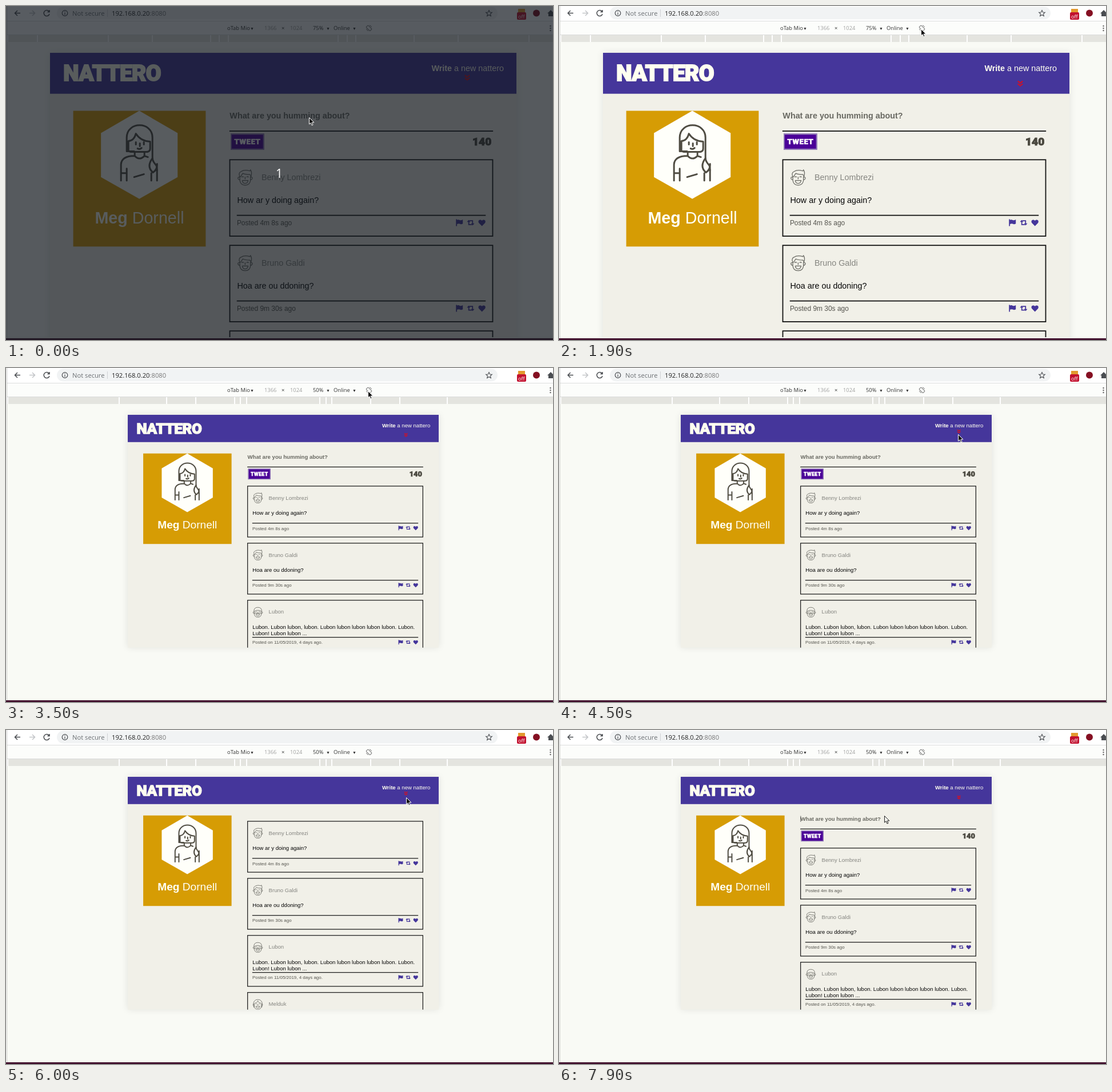
An HTML page for the animation above (8000 ms loop, 957 by 585 pixels).

```html
<!DOCTYPE html>
<html lang="en">
<head>
<meta charset="utf-8">
<title>Responsive demo</title>
<style>
* { box-sizing: border-box; margin: 0; padding: 0 }
html, body { width: 100%; height: 100%; overflow: hidden; background: #fff }
#stage { position: relative; width: 957px; height: 585px; overflow: hidden; background: #fff; font-family: "Liberation Sans", Arial, sans-serif }
#stage svg { display: block; overflow: visible }
.bar { position: absolute; inset: 0 0 auto; font-family: "Open Sans", sans-serif; white-space: nowrap }
.bar span { position: absolute; transform: translateY(-50%); line-height: 1 }
.chrome { position: absolute; left: 0; top: 0 }
.tools span { top: 39px; font-size: 9.4px; color: #333 }
.tools .dim { color: #a0a0a0 }
#ruler { position: absolute; left: 4px; right: 0; top: 51px; height: 12px; background: #e4e4df; overflow: hidden }
#ruler i { position: absolute; top: 0; width: 2px; height: 12px; background: #fff }
#view { position: absolute; left: 0; right: 0; top: 63px; height: 517px; overflow: hidden; background: #f9faf5 }
#page { position: absolute; top: 18.5px; left: 0; transform-origin: 0 0; overflow: hidden; background: #f1f0e8; font-size: 24px; line-height: 27.6px }
#shade { position: absolute; top: 18.5px; box-shadow: 0 0 12px rgba(0, 0, 0, .1) }
.block { font-family: Roboto, sans-serif; font-weight: 900; -webkit-text-stroke: .05em currentColor }
header { position: absolute; left: 0; right: 0; top: 0; height: 120px; background: #45369b; color: #fffff0 }
header .block { position: absolute; left: 39px; top: 20px; font-size: 65px; line-height: 80px; letter-spacing: -1px }
header p { position: absolute; right: 37px; top: 32px }
#hint { position: absolute; right: 135px; top: -9px; width: 18px; height: 18px }
.profile { position: absolute; left: 5%; top: 170px; width: 28.35%; height: 398px; background: #d69c04; color: #fffff5; text-align: center; font-size: 48px; line-height: 56px; white-space: nowrap }
.profile svg { width: 225px; height: 258px; margin: 0 auto 28px }
.feed { position: absolute; right: 5%; top: 170px; width: 56.55% }
#form { position: relative; height: 118px; overflow: hidden }
#form > * { position: absolute }
#form b { left: 1px; top: 1px; color: #696962 }
#form hr { left: 0; right: 0; top: 58px; height: 3px; border: 0; background: #111 }
#form .send { left: 4px; top: 67px; width: 98px; height: 47px; border: 3px solid #9583b8; background: #4b0098; color: #fff; font-size: 22px; line-height: 42px; text-align: center; letter-spacing: 1px }
#form .count { right: 5px; top: 74px; font-size: 32px; line-height: 34px; color: #4a483f }
#caret { left: 1px; top: 2px; width: 2px; height: 26px; background: #222 }
.card { position: relative; margin-top: 24px; min-height: 227px; border: 3px solid #111; padding: 0 19px }
.card > svg { position: absolute; left: 21px; top: 26px; width: 45px; height: 49px }
.card h4 { height: 103px; padding: 36px 0 0 72px; font-weight: 400; color: #858580 }
.card p { min-height: 57px; padding-left: 1px; color: #050505 }
.card footer { display: flex; height: 61px; border-top: 3px solid #111; font-size: 20px; line-height: 42px; color: #55544e }
.card footer svg { width: 22px; height: 20px; margin: 10px 0 0 11px }
.card footer svg:first-of-type { margin-left: auto }
#edge { position: absolute; left: 0; right: 0; top: 580px; height: 5px; background: linear-gradient(#eeeeea 0 2px, #43132f 2px) }
#side { position: absolute; left: 0; top: 0; width: 2px; height: 582px; background: linear-gradient(90deg, #fff 50%, #c9c9c6 50%) }
#dim { position: absolute; inset: 0; background: rgba(18, 24, 30, .7) }
#dim span { position: absolute; left: 472px; top: 280px; font: 21px/27px "Open Sans", sans-serif; color: #fff }
#mouse { position: absolute; left: 0; top: 0; width: 10px; height: 15px }
</style>
</head>
<body>
<div id="stage">
  <svg class="chrome" width="957" height="51" fill="none" stroke="#4a4d51" stroke-width="1.5">
    <rect x="89" y="1.5" width="771" height="22" rx="11" fill="#f1f3f4" stroke="none"/>
    <path d="M25 12.5H15.500M20 8L15.500 12.500L20 17"/>
    <path stroke="#c3c5c8" d="M41 12.500H50.500M46 8L50.500 12.500L46 17"/>
    <path d="M75.500 10A5 5 0 1 0 76 14M76 7V10.500H72.500"/>
    <g stroke-width="1.200"><circle cx="103" cy="12.500" r="4.800"/><path d="M103 12V15.500M103 9.500V10.800"/></g>
    <path stroke="#cfd1d4" stroke-width="1" d="M177.500 6V19"/>
    <path stroke-width="1.100" d="M845 7.500L846.600 11L850.300 11.300L847.500 13.800L848.300 17.500L845 15.500L841.700 17.500L842.500 13.800L839.700 11.300L843.400 11Z"/>
    <rect x="896" y="5" width="12" height="8" fill="#e39a2f" stroke="none"/>
    <rect x="894" y="11" width="16" height="13" rx="2" fill="#c2112f" stroke="none"/>
    <circle cx="928" cy="12.500" r="6" fill="#850f22" stroke="none"/>
    <path fill="#4a4d51" stroke="none" d="M947 13L953 7L959 13H957V18H949V13Z"/>
    <path stroke="#dcdddd" stroke-width="1" d="M0 26.500H957M0 50.500H957"/>
    <rect y="27" width="957" height="23" fill="#fcfdfb" stroke="none"/>
    <g stroke="#777" stroke-width="1"><rect x="632.500" y="34" width="5" height="9.500" rx="1" transform="rotate(-45 635 38.700)"/><path d="M630.500 40A5 5 0 0 0 634 43.500M639.500 37A5 5 0 0 0 636 33.800"/></g>
    <g fill="#666" stroke="none"><circle cx="952.500" cy="35" r="1.200"/><circle cx="952.500" cy="39" r="1.200"/><circle cx="952.500" cy="43" r="1.200"/></g>
  </svg>
  <div class="bar" style="font-size:11.2px">
    <span style="left:116px;top:12.500px;color:#6b6f73">Not secure</span>
    <span style="left:185px;top:12.500px;color:#222">192.168.0.20<span style="position:static;color:#777">:8080</span></span>
    <span style="left:896px;top:18px;color:#fff;font-size:9px">off</span>
  </div>
  <div class="bar tools">
    <span style="left:387px">oTab Mio</span><span style="left:427px;font-size:7px">▼</span>
    <span class="dim" id="wide" style="left:452px"></span><span style="left:482px">×</span><span class="dim" id="tall" style="left:497px"></span>
    <span id="zoom" style="left:537px"></span><span style="left:560px;font-size:7px">▼</span>
    <span style="left:573px">Online</span><span style="left:606px;font-size:7px">▼</span>
  </div>
  <div id="ruler"></div>
  <div id="view">
    <div id="shade"></div>
    <div id="page">
      <header>
        <div class="block">NATTERO</div>
        <p><b>Write</b> a new nattero</p>
        <svg id="hint" viewBox="0 0 18 18" fill="none" stroke="#dc0d1c" stroke-width="3.400"><path d="M2 2L9 8L16 2M2 10L9 16L16 10"/></svg>
      </header>
      <section class="profile">
        <svg viewBox="0 0 134 154" fill="none" stroke="#504d43" stroke-width="3" stroke-linecap="round" stroke-linejoin="round">
          <path fill="#fffffa" stroke="none" d="M67 0L134 39V116L67 154L0 116V39Z"/>
          <path d="M45 71V47C45 18 90 18 90 47V82C90 94 99 91 98 104M45 71H58M48 69V53Q58 52 61 40Q69 53 86 54V66Q86 72 79 72H55Q48 72 48 69"/>
          <path d="M61 55V59M75 55V59M68 57V62M64 66Q68 68 71 65"/>
          <path d="M59 73V79Q67 88 76 79V73M59 79Q36 79 35 94V122M35 109H45M45 101V122M76 79L82 81M90 83Q79 98 91 108Q99 102 98 93M88 109V122M98 104V122M58 116L75 111"/>
        </svg>
        <b>Meg</b> Dornell
      </section>
      <section class="feed">
        <div id="form">
          <b>What are you humming about?</b><i id="caret"></i><hr>
          <div class="block send">TWEET</div><div class="block count">140</div>
        </div>
        <div id="cards"></div>
      </section>
    </div>
  </div>
  <div id="edge"></div><div id="side"></div>
  <div id="dim"><span>1</span></div>
  <svg id="mouse" viewBox="0 0 10 15"><path d="M.5 .5V12L3.200 9.700L5 14L7 13.200L5.200 9H9Z" stroke-width="1"/></svg>
</div>
<script>
const $ = id => document.getElementById(id);
const LOOP = 8000, MID = 485, UNIT = .7965;

const hair = {
  tuft: 'M4 13Q1 6 6 4Q12 0 21 3L22 1Q25 5 23 12L21 9Q13 9 9 7Q7 10 5 13',
  beard: 'M3 12Q3 2 13 2Q23 2 23 12M4 12Q13 7 22 12M4 17Q8 15 13 18Q18 15 22 17',
  wig: 'M3 22Q0 12 4 6Q8 1 13 2Q18 1 22 6Q26 12 23 22M5 11Q12 10 13 5Q14 10 21 11'
};
const face = style => `<svg viewBox="0 0 26 28" fill="none" stroke="#686862" stroke-width="1.2" stroke-linejoin="round">
  <path d="M4 12V19Q5 27 13 27Q21 27 22 19V12M4 13Q0 13 1 16Q2 18 4 18M22 13Q26 13 25 16Q24 18 22 18"/>
  <path d="M7 13.5Q9 11.500 10.500 13.500M15.500 13.500Q17 11.500 19 13.500M13 13V17M8 19H18Q17 24 13 24Q9 24 8 19"/>
  <path d="${hair[style]}"/></svg>`;
const icon = d => `<svg viewBox="0 0 22 20" fill="#45369b"><path d="${d}"/></svg>`;
const icons = [
  'M1 0H4V2Q8 0 12 2.500Q16 4 21 1V13Q16 16 12 13.500Q8 12 4 14V20H1Z',
  'M5 2L10 8H7V14H13L16 17H4V8H0ZM17 18L12 12H15V6H9L6 3H18V12H22Z',
  'M11 20L2 11C-2 5 4 -2 11 4C18 -2 24 5 20 11Z'
].map(icon).join('');
const card = ([name, text, when, style]) =>
  `<article class="card">${face(style)}<h4>${name}</h4><p>${text}</p><footer>Posted ${when}${icons}</footer></article>`;
$('cards').innerHTML = [
  ['Benny Lombrezi', 'How ar y doing again?', '4m 8s ago', 'tuft'],
  ['Bruno Galdi', 'Hoa are ou ddoning?', '9m 30s ago', 'tuft'],
  ['Lubon', 'Lubon. Lubon lubon, lubon. Lubon lubon lubon lubon lubon. Lubon. Lubon! Lubon lubon ...', 'on 11/05/2019, 4 days ago.', 'beard'],
  ['Melduk', 'Good morning to everyone.', 'on 11/05/2019, 4 days ago.', 'wig']
].map(card).join('');

// Device widths marked on the ruler, mirrored about the middle
const ticks = [320, 375, 425, 768, 1024, 1440, 2560].flatMap(w => [-w, w]).map(w => {
  const el = document.createElement('i');
  $('ruler').append(el);
  return { el, w };
});

let current;
function setDevice(w, h, zoom) {
  const key = w + ':' + zoom;
  if (key === current) return;
  current = key;
  const s = zoom / 100 * UNIT, x = MID - w * s / 2;
  Object.assign($('page').style, { width: w + 'px', height: h + 'px', transform: `translateX(${x}px) scale(${s})` });
  Object.assign($('shade').style, { left: x + 'px', width: w * s + 'px', height: h * s + 'px' });
  for (const { el, w } of ticks) el.style.left = MID - 5 + w * s / 2 + 'px';
  $('wide').textContent = w;
  $('tall').textContent = h;
  $('zoom').textContent = zoom + '%';
}

const clamp = v => Math.min(1, Math.max(0, v));
const swing = p => .5 - Math.cos(Math.PI * clamp(p)) / 2;

// CSS "ease": cubic-bezier(.25, .1, .25, 1)
function ease(x) {
  const curve = (u, a, b) => 3 * u * (1 - u) * ((1 - u) * a + u * b) + u ** 3;
  let lo = 0, hi = 1;
  for (let i = 0; i < 16; i++) {
    const m = (lo + hi) / 2;
    if (curve(m, .25, .25) < x) lo = m; else hi = m;
  }
  return curve(lo, .1, 1);
}

const path = [
  [0, 530, 195], [400, 530, 195], [1000, 631, 28], [1200, 632, 27], [1500, 633, 40], [4000, 633, 40],
  [4500, 698, 116], [4600, 698, 116], [4700, 700, 118], [7300, 700, 118], [7900, 569, 150], [LOOP, 569, 150]
];
function pointer(t) {
  const i = path.findIndex(p => p[0] > t), [t0, x0, y0] = path[i - 1], [t1, x1, y1] = path[i];
  const p = swing((t - t0) / (t1 - t0));
  return [x0 + (x1 - x0) * p, y0 + (y1 - y0) * p];
}

const blink = (t, from) => t >= from && (t - from) % 1000 < 500;

function draw(t) {
  $('dim').style.display = t < 300 ? '' : 'none';

  if (t < 2100) setDevice(1366, 1024, 75);
  else if (t < 3300) setDevice(1024, 1366, 44);
  else setDevice(1366, 1024, 50);

  const bob = (t + 1190) % 1500 / 1500;
  $('hint').style.transform = `translateY(${90.5 - 18.5 * ease(bob)}px)`;

  const open = t < 6500 ? 1 - swing((t - 5600) / 400) : swing((t - 6900) / 400);
  $('form').style.height = 118 * open + 'px';
  $('caret').style.display = (t < 6500 ? blink(t, 5200) : blink(t, 6900)) ? '' : 'none';

  const [x, y] = pointer(t), hollow = t >= 300 && t < 700 || t >= 7700;
  $('mouse').style.transform = `translate(${x}px, ${y}px)`;
  $('mouse').style.fill = hollow ? '#f4f4ee' : '#111';
  $('mouse').style.stroke = hollow ? '#222' : '#fff';
}

const start = performance.now();
function tick() {
  draw(Math.floor((performance.now() - start) % LOOP / 100) * 100);
  requestAnimationFrame(tick);
}
tick();
</script>
</body>
</html>
```
